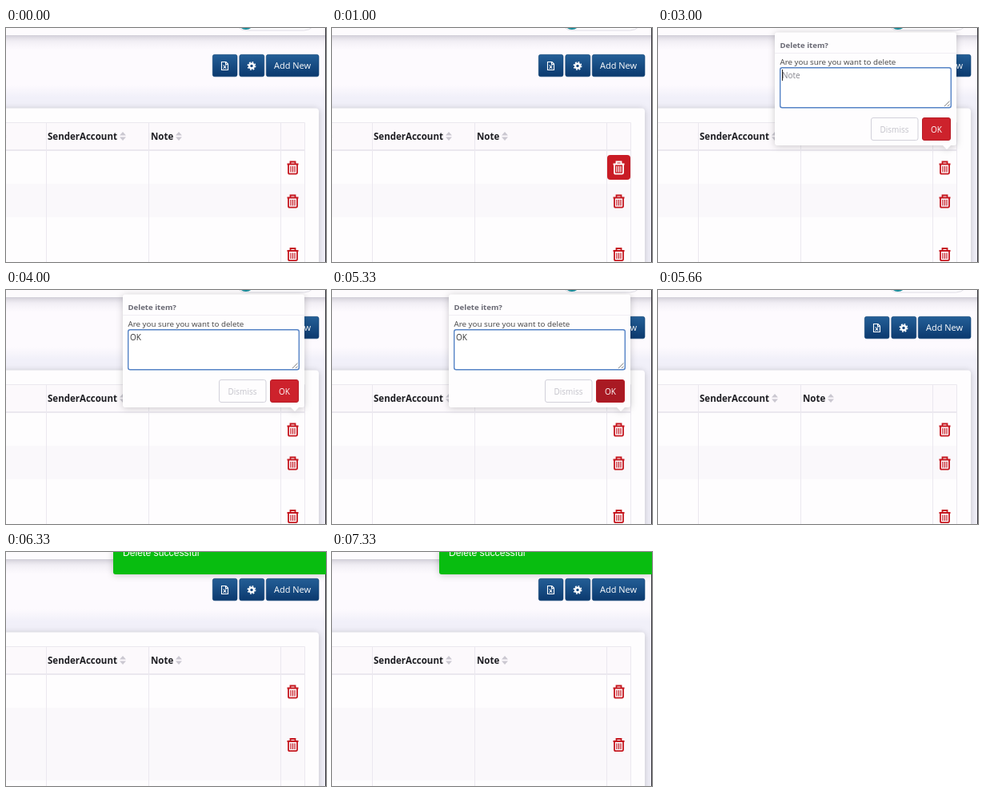
Write an HTML page that moves like this. It is 400 px wide and 293 px high and loops after 8.33 s.

```html
<!DOCTYPE html>
<html lang="en">
<head>
<meta charset="utf-8">
<title>Delete item</title>
<style>
html, body { margin: 0; width: 100%; height: 100%; overflow: hidden; background: #f1f0f9; }
svg { display: block; width: 400px; height: 293px; }
text { font-family: "Open Sans", "Noto Sans", sans-serif; font-size: 10px; fill: #444; }
.head { font-size: 11.5px; font-weight: 700; fill: #1d1d22; }
.grid { fill: none; stroke: #ebe8ef; }
.soft { filter: drop-shadow(0 1px 4px #0003); }
</style>
</head>
<body>
<svg viewBox="0 0 400 293">
  <defs>
    <linearGradient id="blue" x2="0" y2="1"><stop stop-color="#245f97"/><stop offset="1" stop-color="#0b396e"/></linearGradient>
    <linearGradient id="shade" x2="0" y2="1"><stop stop-color="#b9b6c2" stop-opacity=".65"/><stop offset=".4" stop-color="#d5d2dd" stop-opacity=".3"/><stop offset="1" stop-color="#e5e2ec" stop-opacity="0"/></linearGradient>
    <linearGradient id="fade" x2="0" y2="1"><stop offset=".8" stop-color="#fdfafe"/><stop offset="1" stop-color="#f1f0f9"/></linearGradient>
    <g id="sort" fill="#cbc8d1"><path d="M-4 -1L0 -5.500L4 -1ZM-4 1L0 5.500L4 1Z"/></g>
    <g id="bin" fill="none" stroke="currentColor">
      <path d="M-7 -4.500H7M-3 -5V-7.500H3V-5" stroke-width="1.800"/>
      <path d="M-5.500 -4V6Q-5.500 7.700 -4 7.700H4Q5.500 7.700 5.500 6V-4" stroke-width="1.800"/>
      <path d="M-2.500 -2V5.500M0 -2V5.500M2.500 -2V5.500" stroke-width="1.200"/>
    </g>
  </defs>

  <!-- page -->
  <rect width="400" height="293" fill="#f1f0f9"/>
  <rect y="9" width="400" height="78" fill="url(#fade)"/>
  <rect y="9" width="400" height="19" fill="url(#shade)"/>
  <rect width="400" height="9" fill="#fdfbfd"/>
  <rect x="284.500" y="-30" width="104" height="33" rx="16" fill="#fdfcfe" stroke="#dedce4"/>
  <circle cx="300" cy="-8.500" r="10.500" fill="#178d9b"/>

  <!-- toolbar -->
  <g fill="url(#blue)" stroke="#0f4073" stroke-width=".6">
    <rect x="258.300" y="33.300" width="30.700" height="27.500" rx="2.500"/>
    <rect x="291.800" y="33.300" width="31" height="27.500" rx="2.500"/>
    <rect x="325.300" y="33.300" width="65.700" height="27.500" rx="2.500"/>
  </g>
  <path d="M269.500 42.500H275L277.500 45V52.500H269.500ZM274.500 42.500V45.500H277.500M271.700 46.500L275.300 51M275.300 46.500L271.700 51" fill="none" stroke="#fff" stroke-width="1.100"/>
  <g fill="none" stroke="#fff">
    <circle cx="307" cy="47.500" r="2.900" stroke-width="2.300"/>
    <circle cx="307" cy="47.500" r="4.700" stroke-width="1.500" stroke-dasharray="1.846"/>
  </g>
  <text x="335" y="51.300" style="font-size:11px;fill:#fff">Add New</text>

  <!-- table -->
  <rect class="soft" x="-10" y="100.500" width="401" height="210" rx="4" fill="#fefdfe"/>
  <rect y="118" width="373" height="35" fill="#fcf9fc"/>
  <g id="rows"></g>
  <path class="grid" d="M0 118.500H373.500V293M50.500 118V293M178.500 118V293M343.500 118V293"/>
  <path class="grid" d="M0 153H374" stroke-width="2"/>
  <text class="head" x="52" y="139.700">SenderAccount</text>
  <text class="head" x="181" y="139.700">Note</text>
  <use href="#sort" x="146" y="135.500"/>
  <use href="#sort" x="216" y="135.500"/>
  <use href="#sort" x="-3.500" y="135.500"/>
  <rect id="hover" x="344" y="159" width="29" height="31" rx="4" fill="#c91c25"/>
  <g id="bins"></g>
  <rect x="399" width="1" height="293" fill="#34333a"/>

  <!-- confirmation -->
  <g id="popup">
    <path class="soft" d="M149 5.500H370Q373 5.500 373 8.500V144Q373 147 370 147H366L361 152L356 147H149Q146 147 146 144V8.500Q146 5.500 149 5.500Z" fill="#fefdfe"/>
    <path d="M146 31.500H373" stroke="#f0eef3"/>
    <text x="152.500" y="24.700" style="font-size:9.600px;font-weight:700;fill:#686873">Delete item?</text>
    <text x="152.500" y="45.500" style="font-size:9.800px">Are you sure you want to delete</text>
    <rect id="field" x="152.700" y="49.700" width="213.600" height="50" rx="2.500" fill="#fff" stroke-width="1.400"/>
    <path d="M358 98L364.500 91.500M362 98L364.500 95.500" stroke="#777" stroke-width=".9"/>
    <text id="input" x="155" y="63.200"></text>
    <rect id="caret" y="52" width="1" height="14" fill="#222"/>
    <rect id="dismiss" x="266.500" y="112.500" width="58.500" height="28" rx="2.500" stroke="#d2d1da"/>
    <text id="dismissText" x="277.500" y="130.700">Dismiss</text>
    <rect id="ok" x="330.500" y="112.500" width="35" height="28" rx="2.500" stroke="#b71c26"/>
    <text x="341" y="130.700" style="fill:#fff">OK</text>
  </g>

  <!-- notice -->
  <g id="toast">
    <path class="soft" d="M134 -5H400V28H137Q134 28 134 25Z" fill="#08bd10"/>
    <text x="146" y="5" style="font:12.200px 'Liberation Sans',Arial,sans-serif;fill:#fff">Delete successful</text>
  </g>
</svg>
<script>
const LOOP = 8330;
const $ = id => document.getElementById(id);
const show = (id, on) => $(id).style.display = on ? "" : "none";
const within = (t, a, b) => t >= a && t < b;
const bin = (y, color) => `<use href="#bin" x="358.5" y="${y}" color="${color}"/>`;
const band = (y, h, fill) =>
  `<rect y="${y}" width="373" height="${h}" fill="${fill}"/><path class="grid" d="M0 ${y + h}.5H374"/>`;

function drawTable(deleted, hot) {
  const heights = deleted ? [42, 91, 60] : [42, 42, 91];
  let y = 153, rows = "", bins = "";
  heights.forEach((h, i) => {
    rows += band(y, h, i % 2 ? "#faf8fb" : "#fefdfe");
    bins += bin(y + h / 2 + 1, hot && !i ? "#fff" : "#c5161e");
    y += h;
  });
  $("rows").innerHTML = rows;
  $("bins").innerHTML = bins;
}

function drawPopup(t) {
  const typed = t >= 3660, focused = t >= 1660, over = within(t, 1660, 2000);
  $("field").setAttribute("stroke", focused ? "#5583c6" : "#cfced8");
  $("input").textContent = typed ? "OK" : "Note";
  $("input").style.fill = typed ? "#333" : "#85858d";
  $("caret").setAttribute("x", typed ? 169 : 155);
  show("caret", [[1660, 2330], [3000, 4000], [4660, 5000]].some(s => within(t, ...s)));
  $("dismiss").setAttribute("fill", over ? "#f0eff6" : "#fefdfe");
  $("dismissText").style.fill = over ? "#8d8d98" : "#c3c2ca";
  $("ok").setAttribute("fill", t < 5000 ? "#cd222c" : t < 5330 ? "#bd1e28" : "#a91a23");
}

let start, last;
function frame(now) {
  start ??= now;
  const t = (now - start) % LOOP;
  const hot = within(t, 660, 1660), deleted = t >= 6000;
  const state = `${hot}${deleted}`;
  if (state !== last) drawTable(deleted, hot);
  last = state;
  show("hover", hot);
  show("popup", within(t, 1330, 5660));
  show("toast", t >= 6330);
  drawPopup(t);
  requestAnimationFrame(frame);
}
requestAnimationFrame(frame);
</script>
</body>
</html>
```
